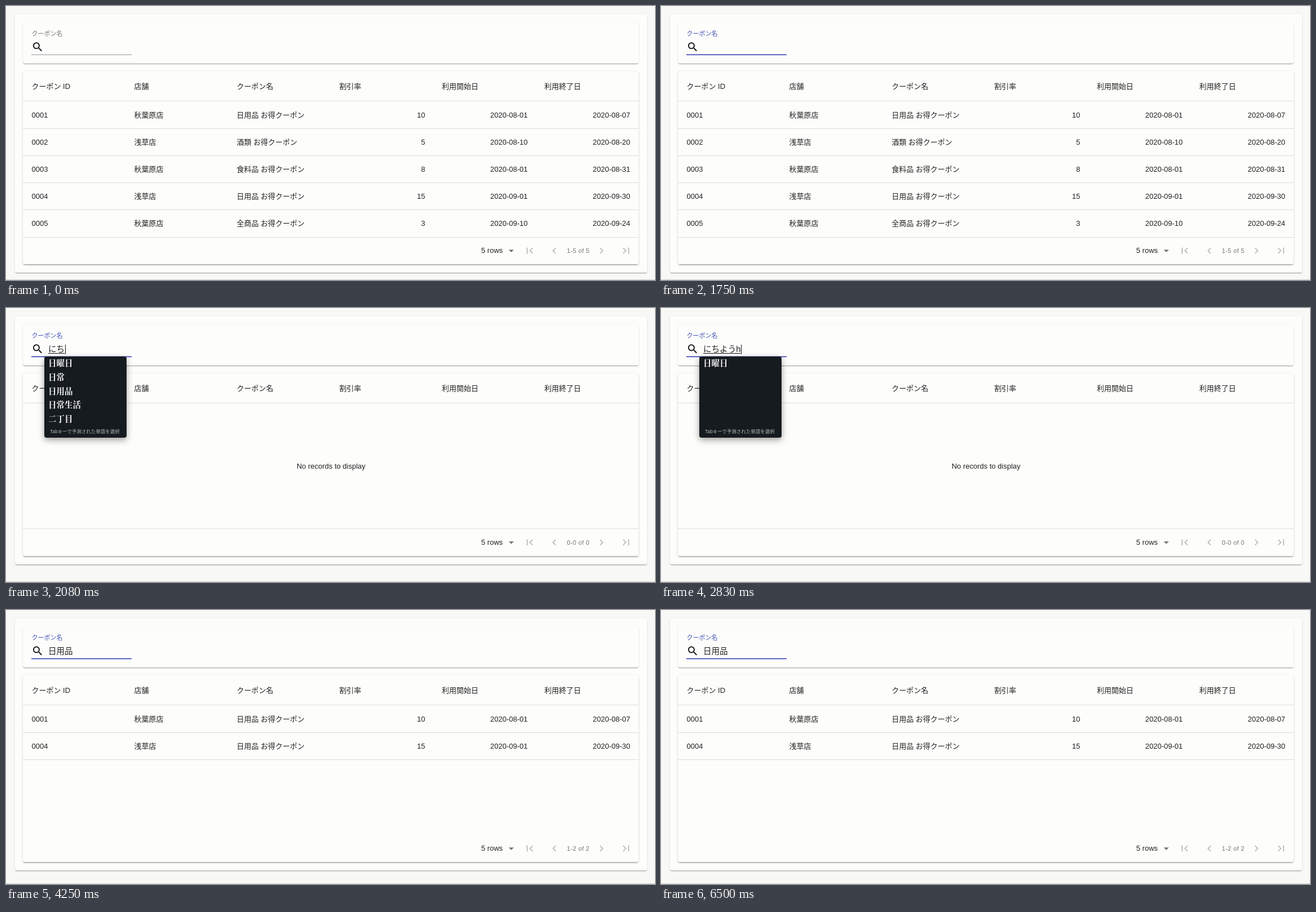
These frames come from a looping animation (1152 px wide and 486 px high, 6.58 s). An HTML page:

```html
<!DOCTYPE html>
<html lang="ja">
<head>
<meta charset="utf-8">
<title>クーポン検索</title>
<style>
  html, body { margin: 0; width: 100%; height: 100%; overflow: hidden; background: #f8f8f7; }
  #stage { position: relative; width: 1152px; height: 486px; overflow: hidden; background: #f8f8f7; }
  .card { position: absolute; background: #fdfdfb; border-radius: 4px;
    box-shadow: 0 2px 1px -1px rgba(0,0,0,.2), 0 1px 1px rgba(0,0,0,.14), 0 1px 3px rgba(0,0,0,.12); }
  #table { box-shadow: 0 3px 1px -2px rgba(0,0,0,.2), 0 2px 2px rgba(0,0,0,.14), 0 1px 4px rgba(0,0,0,.12); }
  svg { position: absolute; left: 0; top: 0; }
  text { font: 350 13px "Liberation Sans", "Noto Sans CJK JP", "Noto Sans CJK", sans-serif; fill: #212121; white-space: pre; }
  .end { text-anchor: end; }
  .mid { text-anchor: middle; }
  #label { font-size: 11px; }
  #typed { font-size: 14.56px; }
  #count { font-size: 11px; letter-spacing: .36px; fill: #757575; }
  .rule { fill: #dcdcde; }
  #popup { position: absolute; left: 68px; top: 86px; width: 146px; height: 144px; border-radius: 4px;
    background: #161b20; box-shadow: 0 4px 12px rgba(0,0,0,.38); }
  #popup svg { width: 146px; height: 144px; }
  .word { font: bold 14.5px "Noto Serif CJK JP", "Noto Serif CJK", "Noto Sans CJK JP", "Noto Sans CJK", serif; fill: #fff; }
  .hint { font-size: 8.5px; fill: #b4b7ba; }
</style>
</head>
<body>
<div id="stage">
  <div class="card" id="page" style="left:16px;top:15px;width:1122px"></div>
  <div class="card" style="left:30px;top:29px;width:1093px;height:73px"></div>
  <div class="card" id="table" style="left:30px;top:116px;width:1093px"></div>
  <svg width="1152" height="486" id="view">
    <rect y="485" width="1152" height="1" fill="#cfcfca"/>
    <text id="label" x="45.5" y="53.2">クーポン名</text>
    <path transform="translate(45.3 61.8) scale(.91)" fill="#111" d="M15.5 14h-.79l-.28-.27C15.41 12.59 16 11.11 16 9.5 16 5.91 13.09 3 9.5 3S3 5.91 3 9.5 5.91 16 9.5 16c1.61 0 3.09-.59 4.23-1.57l.27.28v.79l5 4.99L20.49 19l-4.99-5zm-6 0C7.01 14 5 11.99 5 9.5S7.01 5 9.5 5 14 7.01 14 9.5 11.99 14 9.5 14z"/>
    <rect x="45" y="86" width="178" height="1" fill="#979799"/>
    <rect id="line" y="85.6" height="1.6" fill="#323fb7"/>
    <rect id="mark" x="75" y="65" height="16" fill="#a9cdf4"/>
    <text id="typed" x="75" y="78"></text>
    <rect id="under" x="75" y="80" height="1" fill="#111"/>
    <rect id="caret" y="65" width="1" height="17" fill="#111"/>
    <g id="head"></g>
    <g id="rows"></g>
    <text id="none" class="mid" x="577" y="285">No records to display</text>
    <g id="foot">
      <rect id="footline" class="rule" x="30" y="410" width="1093" height="1"/>
      <text x="843.5" y="438.3">5 rows</text>
      <text id="count" class="mid" x="1015.7" y="438"></text>
    </g>
  </svg>
  <div id="popup"><svg><g id="words"></g><text class="hint" x="10" y="136">Tabキーで予測された単語を選択</text></svg></div>
</div>
<script>
const LOOP = 6580, FOCUS = 800, CONVERT = 3080, DONE = 3580, PITCH = 48.2;
const $ = id => document.getElementById(id);
const set = (el, attrs) => { for (const k in attrs) el.setAttribute(k, attrs[k]); return el; };
const show = (el, on) => { el.style.display = on ? '' : 'none'; };
function add(parent, tag, attrs, str = '') {
  const el = set(document.createElementNS('http://www.w3.org/2000/svg', tag), attrs);
  el.textContent = str;
  parent.append(el);
  return el;
}

const titles = ['クーポン ID', '店舗', 'クーポン名', '割引率', '利用開始日', '利用終了日'];
const coupon = (id, shop, kind, rate, from, to) =>
  [id, shop + '店', kind + ' お得クーポン', rate, '2020-' + from, '2020-' + to];
const data = [
  coupon('0001', '秋葉原', '日用品', 10, '08-01', '08-07'),
  coupon('0002', '浅草', '酒類', 5, '08-10', '08-20'),
  coupon('0003', '秋葉原', '食料品', 8, '08-01', '08-31'),
  coupon('0004', '浅草', '日用品', 15, '09-01', '09-30'),
  coupon('0005', '秋葉原', '全商品', 3, '09-10', '09-24')
];
const matches = data.filter(r => r[2].startsWith('日用品'));

// typed text and the suggestions beneath it
const many = ['日曜日', '日常', '日用品', '日常生活', '二丁目'];
const typing = [
  [0, ''], [1830, 'n'], [1920, 'に', many], [2000, 'にc', many], [2080, 'にち', many],
  [2330, 'にちy', many], [2500, 'にちよ', ['日曜日', '日用品']], [2670, 'にちよう', ['日曜日', '日用品']],
  [2830, 'にちようh', ['日曜日']], [2920, 'にちようひ', ['日曜日']], [3000, 'にちようひん', ['日用品']],
  [CONVERT, '日用品']
];
// rows shown, shift of the lower edge
const tables = [[0, data, 0], [2000, [], -18.3], [3250, matches, -11]];
const at = (list, t) => list.filter(s => s[0] <= t).pop();

const colX = i => 45.5 + 182 * i;
titles.forEach((s, i) => add($('head'), 'text', { x: colX(i), y: 147 }, s));
add($('head'), 'rect', { class: 'rule', x: 30, y: 168, width: 1093, height: 1 });

const icons = [
  [886, 'M7 10l5 5 5-5z', '#757570'],
  [918.7, 'M18.41 16.59L13.82 12l4.59-4.59L17 6l-6 6 6 6zM6 6h2v12H6z'],
  [962.4, 'M15.41 7.41L14 6l-6 6 6 6 1.41-1.41L10.83 12z'],
  [1046, 'M10 6L8.59 7.41 13.17 12l-4.58 4.59L10 18l6-6z'],
  [1089.7, 'M5.59 7.41L10.18 12l-4.59 4.59L7 18l6-6-6-6zM16 6h2v12h-2z']
];
for (const [x, d, fill = '#bcbcbc'] of icons)
  add($('foot'), 'path', { d, fill, transform: `translate(${x} 423.1) scale(.91)` });

function drawTable(rows, shift) {
  const g = $('rows'), n = rows.length;
  g.replaceChildren();
  rows.forEach((row, r) => {
    row.forEach((s, i) => {
      const right = i > 2;
      add(g, 'text', { x: right ? colX(i) + 152.5 : colX(i), y: 197.6 + PITCH * r, class: right ? 'end' : '' }, s);
    });
    if (r < 4) add(g, 'rect', { class: 'rule', x: 30, y: Math.round(168.4 + PITCH * (r + 1)), width: 1093, height: 1 });
  });
  show($('none'), !n);
  show($('footline'), n !== 2);
  set($('footline'), { y: 410 - (n ? 0 : .7) });
  set($('foot'), { transform: `translate(0 ${shift})` });
  $('count').textContent = `${n ? 1 : 0}-${n} of ${n}`;
  $('table').style.height = Math.round(342 + shift) + 'px';
  $('page').style.height = Math.round(458 + shift) + 'px';
}

function drawInput(str, words) {
  $('typed').textContent = str;
  const w = str ? $('typed').getComputedTextLength() : 0;
  set($('under'), { width: w });
  set($('mark'), { width: w });
  set($('caret'), { x: Math.round(75.9 + w) });
  show($('popup'), words);
  $('words').replaceChildren();
  (words || []).forEach((s, i) => add($('words'), 'text', { class: 'word', x: 7, y: 17.4 + 24.6 * i }, s));
}

let table, input;
function draw(t) {
  const nextTable = at(tables, t), nextInput = at(typing, t);
  if (nextTable !== table) drawTable(...(table = nextTable).slice(1));
  if (nextInput !== input) drawInput(...(input = nextInput).slice(1));

  const p = Math.min(1, Math.max(0, (t - FOCUS) / 200));
  const grow = 1 - (1 - p) ** 3;
  set($('line'), { x: 134 - 89 * grow, width: 178 * grow });
  const mix = (a, b) => Math.round(a + (b - a) * grow);
  $('label').style.fill = `rgb(${mix(117, 63)},${mix(117, 81)},${mix(117, 181)})`;

  const typingNow = t >= typing[1][0] && t < CONVERT;
  const marked = t >= CONVERT && t < DONE;
  const since = t >= DONE ? t - DONE : t - FOCUS;
  show($('mark'), marked);
  show($('under'), typingNow || marked);
  set($('under'), { height: marked ? 2 : 1 });
  show($('caret'), typingNow || (!marked && since >= 0 && since % 1000 < 500));
}

const start = performance.now();
function tick() {
  draw((performance.now() - start) % LOOP);
  requestAnimationFrame(tick);
}
tick();
</script>
</body>
</html>
```
